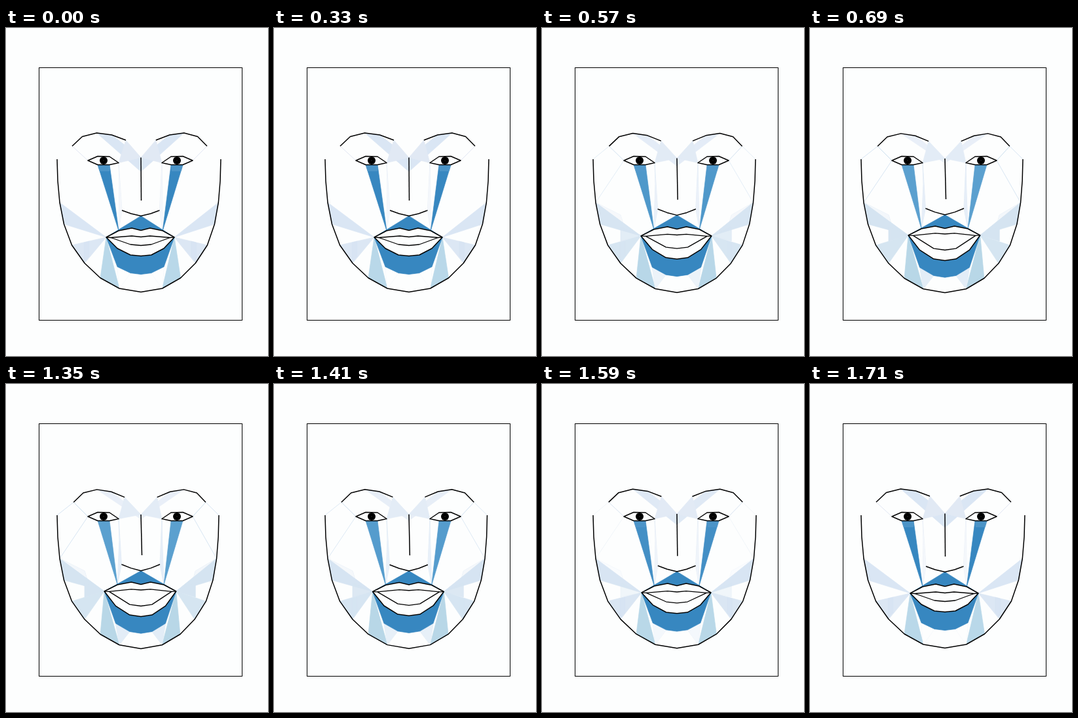
An HTML page with a canvas for the animation above (2040 ms loop, 400 by 500 pixels).

```html
<!DOCTYPE html>
<html lang="en">
<head>
<meta charset="utf-8">
<title>Face shading</title>
<style>
html, body { margin: 0; width: 100%; height: 100%; overflow: hidden; background: #fdfefe; }
canvas { display: block; }
</style>
</head>
<body>
<canvas width="400" height="500"></canvas>
<script>
const ctx = document.querySelector('canvas').getContext('2d');
const LOOP = 2040, STEP = 60, AXIS = 206;
const PAPER = '#fdfefe', BLUE = '#3787c0';

const lerp = (a, b, u) => a + (b - a) * u;
// The head is turned slightly, so the right half is narrower than the left.
const narrow = amount => d => d * (1 - amount * d);
const slightTurn = narrow(0.00037), mouthTurn = narrow(0.0007);

// Half contours, outside to centre, as [distance from the axis, y].
// "smile" moves a point to the smiling pose; "turn" gives its distance on the right.
const stretchLip = (d, y) => [d * 1.055, y - 3];
const dropLip = (d, y) => [d * 1.07, y + 7 - 10 * (d / 53) ** 2];
const features = {
  jaw: {
    rest: [[128, 200], [127, 233], [124, 266], [117.5, 299], [105.5, 331], [86, 358.5], [62, 381], [33, 397], [0, 402.5]],
    smile: (d, y) => [d, y + 1 - d / 128],
    turn: (d, u) => narrow(lerp(0.00037, 0.00055, u))(d)
  },
  brow: {
    rest: [[105, 180], [89.5, 165.5], [67.5, 160], [44.5, 163], [23, 171]],
    smile: (d, y) => [lerp(61, d, 0.95), y + 2 - d / 60],
    turn: slightTurn
  },
  eye: {
    rest: [[81, 202], [66, 195.5], [48, 196], [34, 205.5], [48, 208.5], [66, 208.5]],
    smile: (d, y) => [d, y],
    turn: d => d - 2
  },
  nostril: {
    rest: [[29, 278], [15, 283], [0, 286.5]],
    smile: (d, y) => [d * 1.02, y - 1.7 - d * 0.045],
    turn: mouthTurn
  },
  upperLip: { rest: [[53, 319], [34, 309], [14, 305], [0, 308.5]], smile: stretchLip, turn: mouthTurn },
  lowerLip: { rest: [[36, 336], [16, 346], [0, 347.5]], smile: dropLip, turn: mouthTurn },
  gapTop: { rest: [[53, 319], [46, 319.5], [14, 317], [0, 318.5]], smile: (d, y) => [d * 1.055, y - 4.5 + d * 0.03], turn: mouthTurn },
  gapBottom: { rest: [[16, 330], [0, 331.5]], smile: dropLip, turn: mouthTurn },
  chin: { rest: [[36, 364], [16, 373.5], [0, 375.5]], smile: (d, y) => [d * 1.07, y + 4.7 - 8 * (d / 53) ** 2], turn: mouthTurn }
};

function buildSide(right, u) {
  const place = (d, y, turn = slightTurn) => [right ? AXIS + turn(d, u) : AXIS - d, y];
  const side = { right, at: place };
  for (const [name, { rest, smile, turn }] of Object.entries(features))
    side[name] = rest.map(([d, y]) => {
      const [smileD, smileY] = smile(d, y);
      return place(lerp(d, smileD, u), lerp(y, smileY, u), turn);
    });
  return side;
}

function mix(from, to, u) {
  const channel = (hex, i) => parseInt(hex.slice(i, i + 2), 16);
  return `rgb(${[1, 3, 5].map(i => Math.round(lerp(channel(from, i), channel(to, i), u)))})`;
}

function line(points, color = '#000', width = 1.5, closed = false) {
  ctx.strokeStyle = color;
  ctx.lineWidth = width;
  ctx.beginPath();
  points.forEach(p => ctx.lineTo(...p));
  if (closed) ctx.closePath();
  ctx.stroke();
}

// Patches carry a thin outline in their own colour unless told otherwise.
function patch(color, points, outline = color, alpha = 1) {
  ctx.globalAlpha = alpha;
  ctx.fillStyle = color;
  line(points, outline, 0.7, true);
  ctx.fill();
  ctx.globalAlpha = 1;
}

function shadeSide(side, u) {
  const { at, jaw, brow, eye, nostril, upperLip: [corner, lip], chin } = side;
  const tone = (rest, smile) => mix(rest, smile, u);
  const bridge = at(0, 197.5 + 1.5 * u);

  // Forehead and temple
  patch(tone('#dae6f4', '#e9eff8'), [brow[2], brow[3], bridge, at(0, lerp(219, 206, u))]);
  patch(tone('#e1e9f4', '#e3ecf6'), [brow[4], bridge, eye[3]]);
  line([brow[0], eye[0]], tone('#e2e7f3', '#cbdfee'), 1);
  line([jaw[0], brow[0]], tone(PAPER, '#d8e6f3'), 1);
  line([jaw[2], eye[0]], tone(PAPER, '#d8e6f3'), 1);

  // Beside the nose
  patch(tone('#f4f7fb', '#e6eef8'), [eye[3], nostril[0], lip, at(33, 238)], tone('#e4ebf5', '#d8e6f3'));

  // Cheek and jaw
  patch('#f3f7fb', [jaw[2], at(86, 285), at(82, 298), corner], '#dce9f4', u);
  patch(tone('#dae6f4', '#d5e4f1'), [jaw[2], jaw[3], corner]);
  patch(tone('#dce7f4', '#d5e5f1'), [jaw[4], jaw[5], corner]);
  patch('#d3e1f2', [at(87, 327), at(79, 325), at(79, 348), at(87, 356)], undefined, 0.5 * (1 - u));
  patch('#d5e4f1', [at(86, 303), at(86, 325), corner], undefined, u);
  patch(tone('#b9d8e9', '#b8d7e7'), [jaw[6], jaw[7], corner]);
  patch(tone(PAPER, '#e3edf7'), [jaw[7], chin[0], chin[1]], tone('#edf1f8', '#d5e5f1'));

  // Below the eye
  patch(tone(BLUE, '#5ba0cf'), [eye[5], eye[4], lip]);
  patch('#5a9ccc', [eye[5], eye[4], at(48, 218), at(63, 218)], undefined, 0.6 * (1 - u));
}

function drawEye(side) {
  patch(PAPER, side.eye);
  line(side.eye, '#000', 1.5, true);
  const [x, y] = side.at(57, 202, features.eye.turn);
  for (const [radius, color] of [[6, '#000'], [0.7, '#333']]) {
    ctx.fillStyle = color;
    ctx.beginPath();
    ctx.arc(x, y, radius, 0, 2 * Math.PI);
    ctx.fill();
  }
}

function draw(u) {
  const sides = [buildSide(false, u), buildSide(true, u)];
  const join = pick => [...pick(sides[0]), ...pick(sides[1]).reverse()];
  const upperLip = join(s => [...s.upperLip]);
  const lowerLip = join(s => [...s.lowerLip]);
  const lips = [...upperLip, ...lowerLip.reverse()];

  ctx.fillStyle = PAPER;
  ctx.fillRect(0, 0, 400, 500);
  ctx.lineJoin = 'round';
  sides.forEach(side => shadeSide(side, u));
  patch(BLUE, join(s => [s.upperLip[0], s.nostril[2]]));
  patch(BLUE, join(s => [s.upperLip[0], ...s.chin]));
  patch(PAPER, lips);

  line(join(s => [...s.jaw]));
  line(join(s => [...s.nostril]));
  line([[AXIS, 197.5 + 1.5 * u], [AXIS + 0.5 + u, 263 - 2 * u]]);
  for (const side of sides) {
    line(side.brow);
    drawEye(side);
  }
  line(lips, '#000', 1.5, true);
  line(join(s => [...s.gapTop]), '#000', 1.3);
  line(join(s => [s.gapTop[1], ...s.gapBottom]), '#000', 1.3);

  ctx.lineJoin = 'miter';
  ctx.lineWidth = 1;
  ctx.strokeRect(50.5, 60.5, 310, 385);
}

// Seven stepped poses between rest and smile, with a hold at either end.
function smileAt(time) {
  const ramp = start => Math.min(1, Math.max(0, Math.floor((time - start) / STEP) / 6));
  return ramp(330) - ramp(1350);
}

const start = performance.now();
function tick() {
  draw(smileAt((performance.now() - start) % LOOP));
  requestAnimationFrame(tick);
}
tick();
</script>
</body>
</html>
```
